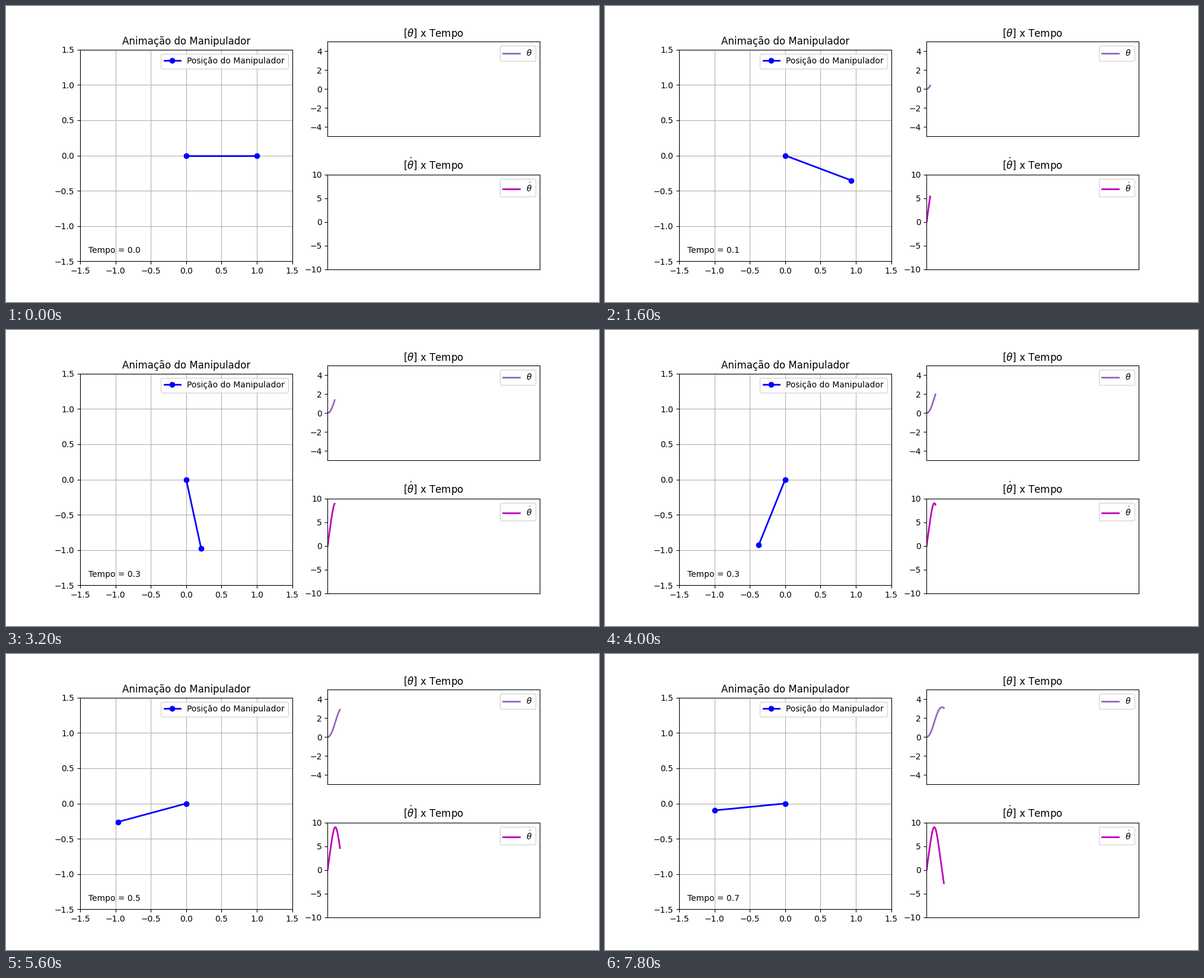
Write a matplotlib script that moves like this. It is 1000 by 500 pixels and loops after 8 s.

```python
import numpy as np
import matplotlib.pyplot as plt
from matplotlib.animation import FuncAnimation

FRAMES, INTERVAL = 40, 200
T_END = 8.0
DT = T_END / 479
K = 40.6  # gravity torque over inertia


def slope(state):
    theta, omega = state
    return np.array([omega, K * np.cos(theta)])


def simulate(count):
    """Integrate the swinging arm with Runge-Kutta steps."""
    states = [np.zeros(2)]
    for _ in range(count - 1):
        s = states[-1]
        k1 = slope(s)
        k2 = slope(s + DT / 2 * k1)
        k3 = slope(s + DT / 2 * k2)
        k4 = slope(s + DT * k3)
        states.append(s + DT / 6 * (k1 + 2 * k2 + 2 * k3 + k4))
    return np.array(states).T


def make_plot(cell, symbol, color, limit, ticks):
    ax = fig.add_subplot(cell)
    ax.set(xlim=(0, T_END), ylim=(-limit, limit), xticks=[], yticks=ticks)
    ax.set_title(f"[{symbol}] x Tempo")
    line, = ax.plot([], [], color=color, lw=2, label=symbol)
    ax.legend(loc="upper right")
    return line


times = np.arange(FRAMES) * DT
theta, omega = simulate(FRAMES)

fig = plt.figure(figsize=(10, 5), dpi=100)
grid = fig.add_gridspec(2, 2, left=0.125, right=0.9, bottom=0.11, top=0.88,
                        wspace=1 / 6, hspace=0.4)

arm_ax = fig.add_subplot(grid[:, 0], aspect="equal")
ticks = np.arange(-1.5, 1.6, 0.5)
arm_ax.set(xlim=(-1.5, 1.5), ylim=(-1.5, 1.5), xticks=ticks, yticks=ticks)
arm_ax.set_title("Animação do Manipulador")
arm_ax.grid(True)
arm, = arm_ax.plot([], [], "bo-", lw=2, label="Posição do Manipulador")
arm_ax.legend(loc="upper right")
clock = arm_ax.text(0.04, 0.04, "", transform=arm_ax.transAxes)

theta_line = make_plot(grid[0, 1], r"$\theta$", "tab:purple", 5, range(-4, 5, 2))
omega_line = make_plot(grid[1, 1], r"$\dot{\theta}$", "m", 10, range(-10, 11, 5))


def update(i):
    arm.set_data([0, np.cos(theta[i])], [0, -np.sin(theta[i])])
    clock.set_text(f"Tempo = {times[i]:.1f}")
    theta_line.set_data(times[:i + 1], theta[:i + 1])
    omega_line.set_data(times[:i + 1], omega[:i + 1])
    return arm, clock, theta_line, omega_line


anim = FuncAnimation(fig, update, frames=FRAMES, interval=INTERVAL,
                     repeat=True, repeat_delay=0)
plt.show()
```
